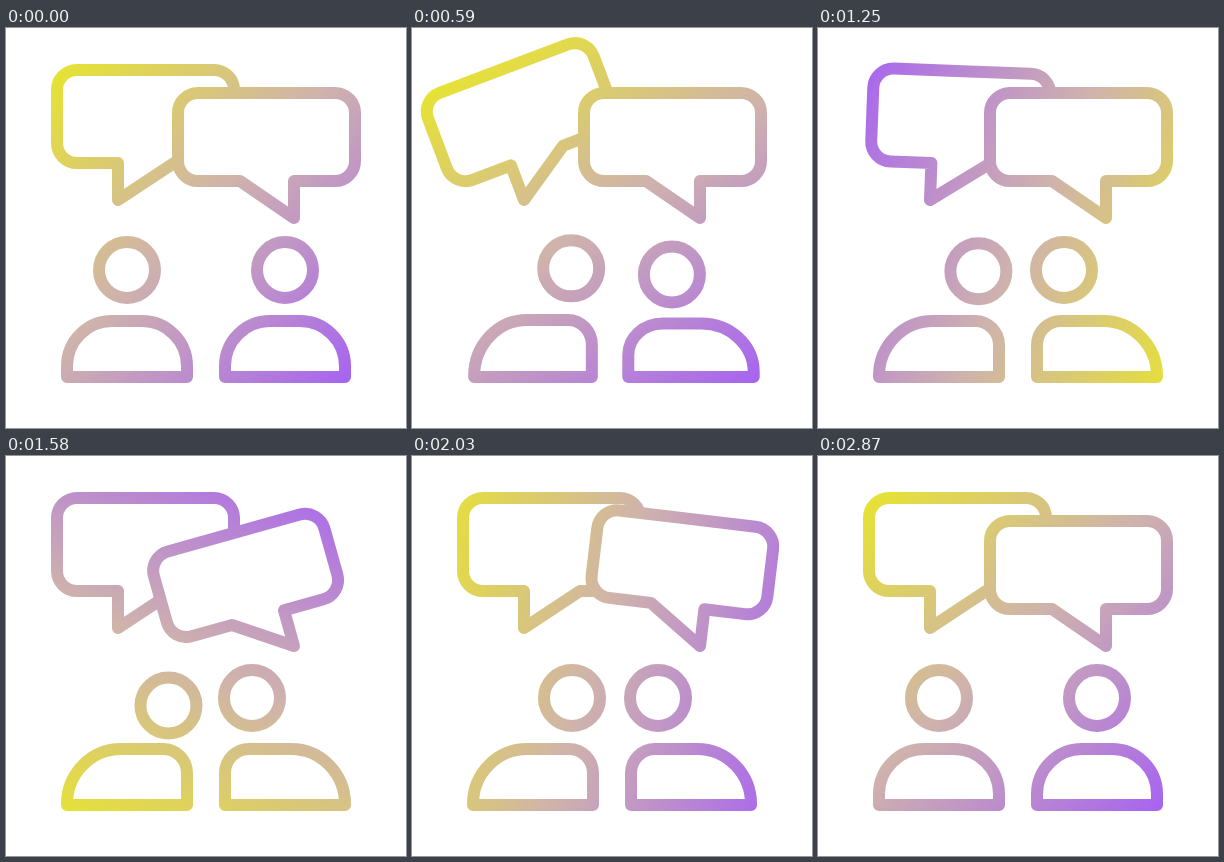
An HTML page with a canvas for the animation above (2.9 s loop, 400 by 400 pixels).

```html
<!DOCTYPE html>
<html lang="en">
<head>
<meta charset="utf-8">
<title>Conversation</title>
<style>
  html, body { margin: 0; width: 100%; height: 100%; overflow: hidden; background: #fff; }
  canvas { display: block; width: 400px; height: 400px; }
</style>
</head>
<body>
<canvas id="stage" width="400" height="400"></canvas>
<script>
const ctx = document.getElementById('stage').getContext('2d');
const LOOP = 2900, TURN = 310;

const clamp = p => Math.min(1, Math.max(0, p));
const mix = (a, b, p) => a + (b - a) * p;
const smooth = p => (1 - Math.cos(Math.PI * p)) / 2;

// CSS-like cubic-bezier timing, solved by bisection
function bezier(x1, y1, x2, y2) {
  const at = (a, b, u) => 3 * (1 - u) * (1 - u) * u * a + 3 * (1 - u) * u * u * b + u * u * u;
  return p => {
    if (p <= 0 || p >= 1) return clamp(p);
    let lo = 0, hi = 1;
    for (let i = 0; i < 24; i++) {
      const u = (lo + hi) / 2;
      if (at(x1, x2, u) < p) lo = u; else hi = u;
    }
    return at(y1, y2, lo);
  };
}
const ease = bezier(.25, .1, .25, 1);
const spinEase = bezier(.35, 0, .48, 1);

// Value at p from [position, value] keys, easing each segment
function keyed(keys, p, easing) {
  if (p <= keys[0][0]) return keys[0][1];
  for (let i = 1; i < keys.length; i++) {
    const [a, from] = keys[i - 1], [b, to] = keys[i];
    if (p < b) return mix(from, to, easing((p - a) / (b - a)));
  }
  return keys[keys.length - 1][1];
}

const SWING = [0, -20.8, 15, -9, 3.7, 0].map((angle, i) => [i, angle]);
const SQUASH = [[0, 0], [.3, -.06], [.7, .02], [1, 0]];
const DIP = [[0, 0], [.45, 4.6], [.72, -2], [1, 0]];

function makeGradient(t) {
  const angle = Math.PI / 4 + 2 * Math.PI * spinEase(clamp((t - 380) / 2160));
  const dx = 212 * Math.cos(angle), dy = 212 * Math.sin(angle);
  const g = ctx.createLinearGradient(200 - dx, 196 - dy, 200 + dx, 196 + dy);
  g.addColorStop(0, '#e6e235');
  g.addColorStop(.47, '#cfb3ac');
  g.addColorStop(1, '#a764f0');
  return g;
}

// Builds a path under a transform, then strokes it in stage space
function outline(transform, trace, fill) {
  ctx.save();
  transform();
  ctx.beginPath();
  trace();
  ctx.restore();
  if (fill) { ctx.fillStyle = fill; ctx.fill(); }
  ctx.stroke();
}

function bubble({ left, right, top, bottom, tip, tail }, angle) {
  const [tx, ty] = tip, r = 20;
  outline(() => {
    ctx.translate(tx, ty);
    ctx.rotate(angle * Math.PI / 180);
    ctx.translate(-tx, -ty);
  }, () => {
    ctx.moveTo((left + right) / 2, top);
    ctx.arcTo(right, top, right, bottom, r);
    ctx.arcTo(right, bottom, left, bottom, r);
    ctx.lineTo(Math.max(tx, tail), bottom);
    ctx.lineTo(tx, ty);
    ctx.lineTo(Math.min(tx, tail), bottom);
    ctx.arcTo(left, bottom, left, top, r);
    ctx.arcTo(left, top, right, top, r);
    ctx.closePath();
  }, '#fff');
}

function person({ x, dir, reach, start, back }, t, nod) {
  const returning = t >= back;
  const p = clamp((t - (returning ? back : start)) / TURN);
  const moved = smooth(clamp(p / .75));
  const facing = returning ? 1 - moved : moved;
  const squash = keyed(SQUASH, p, smooth);

  outline(() => {
    ctx.translate(x, 349);
    ctx.scale(dir * (1 - squash), 1 + squash);
  }, () => {
    const rx = mix(45, 54, facing), ry = mix(45, 55, facing), front = mix(45, 24, facing);
    ctx.moveTo(-60, 0);
    ctx.lineTo(-60, ry - 56);
    ctx.ellipse(rx - 60, ry - 56, rx, ry, 0, Math.PI, Math.PI * 1.5);
    ctx.arcTo(60, -56, 60, 0, front);
    ctx.lineTo(60, 0);
    ctx.closePath();
  });

  const headX = x + dir * (reach * facing + nod * .33);
  const headY = 242 + keyed(DIP, p, smooth) + nod;
  outline(() => {}, () => ctx.arc(headX, headY, 28, 0, 2 * Math.PI));
}

const leftBubble = { left: 51, right: 228, top: 42, bottom: 135, tip: [112, 172], tail: 168 };
const rightBubble = { left: 172, right: 349, top: 65, bottom: 153, tip: [288, 190], tail: 234 };
const leftPerson = { x: 121, dir: 1, reach: 39, start: 380, back: 2530 };
const rightPerson = { x: 279, dir: -1, reach: 33, start: 463, back: 2235 };

function draw(t) {
  ctx.fillStyle = '#fff';
  ctx.fillRect(0, 0, 400, 400);
  ctx.lineWidth = 12;
  ctx.lineJoin = 'round';
  ctx.strokeStyle = makeGradient(t);

  bubble(leftBubble, t < 380 ? 0 : keyed(SWING, (t - 370) / 245, ease));
  bubble(rightBubble, keyed(SWING, (t - 1465) / 255, ease));

  const nod = t > 800 && t < 1840 ? 7.5 * Math.sin(Math.PI * (t - 800) / 520) ** 2 : 0;
  person(leftPerson, t, nod);
  person(rightPerson, t, 0);
}

function tick() {
  draw(performance.now() % LOOP);
  requestAnimationFrame(tick);
}
tick();
</script>
</body>
</html>
```
